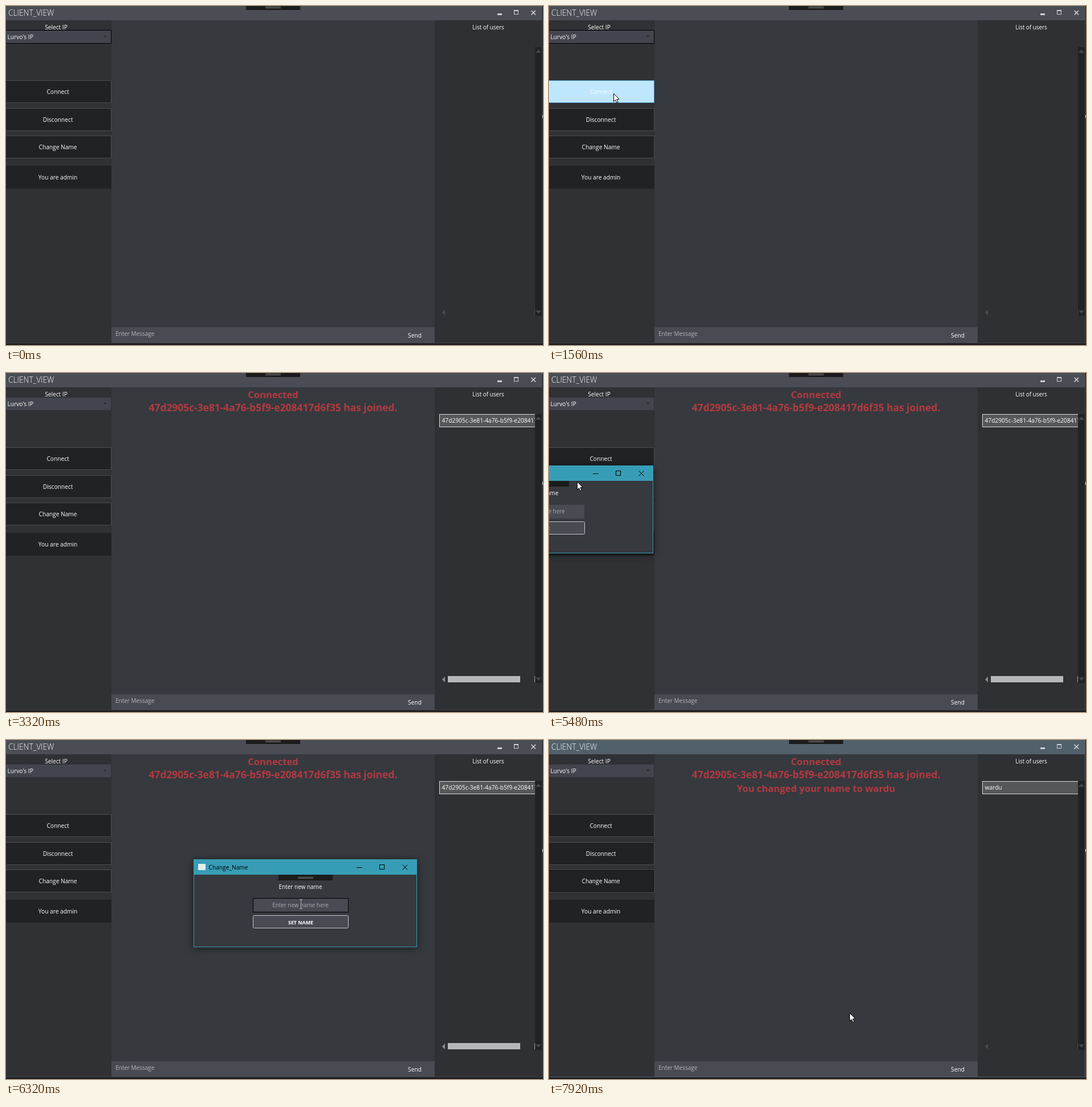
An HTML page with a canvas that plays this animation: 942 px wide and 594 px high, repeating every 8000 ms.

```html
<!DOCTYPE html>
<html lang="en">
<head>
<meta charset="utf-8">
<title>Chat client</title>
<style>
html, body { margin: 0; width: 100%; height: 100%; overflow: hidden; background: #1d1c1e; }
canvas { display: block; }
</style>
</head>
<body>
<canvas id="stage" width="942" height="594"></canvas>
<script>
const g = document.getElementById('stage').getContext('2d');
const LOOP = 8000, STEP = 40;
const FACE = '"Open Sans", "Noto Sans", sans-serif';
const GUID = '47d2905c-3e81-4a76-b5f9-e208417d6f35';
const NAME = 'wardu';
const KEYS = [6720, 6800, 6920, 7000, 7200];
const DIALOG_OPEN = 5480, DIALOG_SHUT = 7640;

// Pointer trips: time, x, y of the tip
const TRIPS = [
  { end: 320, pts: [[40, 926, 588], [160, 895, 579], [280, 828, 590]] },
  { end: 3200, pts: [[1160, 208, 472], [1240, 196, 400], [1360, 150, 240], [1480, 118, 165],
    [1560, 113, 153], [2400, 113, 153], [2600, 108, 200], [2720, 100, 243],
    [2880, 100, 243], [3000, 78, 247], [3200, -14, 250]] },
  { end: 6720, pts: [[5480, 49, 190], [5520, 175, 200], [5560, 305, 211], [5600, 412, 219],
    [5640, 480, 222], [5680, 509, 223], [5720, 516, 222], [5760, 516, 222], [5880, 517, 287]] },
  { end: 8000, pts: [[7200, 516, 292], [7360, 512, 340], [7480, 512, 340], [7560, 514, 318],
    [7640, 514, 318], [7760, 520, 400], [7880, 527, 478]] }
];
const DRAG = [[5480, -209, 162], [5520, -100, 174], [5560, 45, 190], [5600, 180, 202],
  [5640, 275, 209], [5680, 322, 210], [5720, 328, 209], [5760, 329, 209]];

const BUTTONS = [
  { label: 'Connect', y: 130, hover: [[1440, 2480]] },
  { label: 'Disconnect', y: 178.5, hover: [[1400, 1440], [2520, 2640]] },
  { label: 'Change Name', y: 227, hover: [[1320, 1400], [2640, 3200]] }
];

const ramp = (t, a, b) => Math.min(1, Math.max(0, (t - a) / (b - a)));

function along(t, pts) {
  let p = pts[0];
  for (const q of pts) {
    if (t < q[0]) {
      const k = ramp(t, p[0], q[0]);
      return [p[1] + (q[1] - p[1]) * k, p[2] + (q[2] - p[2]) * k];
    }
    p = q;
  }
  return [p[1], p[2]];
}

function mix(a, b, k) {
  return 'rgb(' + a.map((v, i) => Math.round(v + (b[i] - v) * k)).join(',') + ')';
}

function box(x, y, w, h, color) {
  g.fillStyle = color;
  g.fillRect(x, y, w, h);
}

function frame(x, y, w, h, color) {
  g.strokeStyle = color;
  g.lineWidth = 1;
  g.strokeRect(x + .5, y + .5, w - 1, h - 1);
}

function text(s, x, y, o = {}) {
  g.font = `${o.weight || 400} ${o.size || 10.2}px ${FACE}`;
  g.textAlign = o.align || 'center';
  g.fillStyle = o.color || '#fff';
  g.fillText(s, x, y);
}

function shape(pts, color) {
  g.beginPath();
  pts.forEach(([x, y]) => g.lineTo(x, y));
  g.closePath();
  g.fillStyle = color;
  g.fill();
}

function cross(x, y, size, color, width) {
  g.strokeStyle = color;
  g.lineWidth = width;
  g.beginPath();
  g.moveTo(x, y);
  g.lineTo(x + size, y + size);
  g.moveTo(x + size, y);
  g.lineTo(x, y + size);
  g.stroke();
}

function toolTab(x, y, h) {
  box(x, y, 95, h, '#1b1c1b');
  box(x + 34, y + h - 6, 27, 1, '#70716f');
  box(x + 34, y + h - 4, 27, 1, '#70716f');
}

function titleBar(active) {
  box(0, 0, 941, 25, mix([74, 77, 84], [82, 96, 108], active));
  text('CLIENT_VIEW', 4, 17, { size: 13.7, weight: 300, align: 'left' });
  toolTab(421, 0, 7);
  box(862, 13, 8, 3, '#cfd0d1');
  frame(891, 7, 8, 8, '#cfd0d1');
  box(891, 7, 8, 2, '#cfd0d1');
  cross(921.5, 8, 7.5, '#d4d5d6', 1.6);
}

function sidebar(t) {
  box(0, 25, 185, 566, '#303135');
  text('Select IP', 88, 40.5);
  box(0, 43, 184, 22, '#43454e');
  const edge = 1 - ramp(t, 1720, 1880);
  if (edge > 0) frame(-1, 42, 186, 24, `rgba(0,0,0,${edge})`);
  text("Lurvo's IP", 2.5, 58, { align: 'left' });
  shape([[170.5, 52], [176.5, 52], [173.5, 55]], '#2a2b30');

  for (const b of BUTTONS) {
    const y = Math.round(b.y);
    let k = 0;
    for (const [a, z] of b.hover) k += ramp(t, a, a + 80) - ramp(t, z, z + 120);
    k = Math.min(1, k);
    box(-1, y, 186, 40, mix([32, 34, 37], [190, 230, 253], k));
    frame(-1, y, 186, 40, mix([76, 77, 80], [60, 127, 177], k));
    if (b.label === 'Change Name' && t >= DIALOG_SHUT) frame(-1, y + 1, 185, 38, '#08090a');
    text(b.label, 91, y + 24);
  }
  box(0, 280, 185, 40, '#202225');
  text('You are admin', 91, 304);
}

function chat(t) {
  box(185, 25, 567, 538, '#36393e');
  box(185, 563, 567, 28, '#484b52');
  text('Enter Message', 192, 578, { align: 'left', size: 10, color: '#b4b6b9' });
  text('Send', 717, 581);
  const line = (s, y, size) => text(s, 468.5, y, { size, weight: 700, color: '#b23a40' });
  if (t >= 2000) line('Connected', 44, 16.6);
  if (t >= 2160) line(GUID + ' has joined.', 67, 17.4);
  if (t >= 7720) line('You changed your name to ' + NAME, 91, 16.6);
}

function userList(t) {
  box(752, 25, 188, 566, '#2f3034');
  text('List of users', 846, 40.5, { size: 9.9 });
  const renamed = t >= 7720, joined = t >= 2160, wide = joined && !renamed;
  if (joined) {
    g.save();
    g.beginPath();
    g.rect(760, 70, 168, 28);
    g.clip();
    box(761, 72, 175, 22, '#55575a');
    frame(760, 72, 180, 23, '#d9dadb');
    text(renamed ? NAME : GUID, 764.5, 87, { align: 'left' });
    g.restore();
  }
  box(928, 72, 12, 471, '#202225');
  shape([[929, 82], [939, 82], [934, 76.5]], '#48494c');
  shape([[929, 533.5], [939, 533.5], [934, 539]], '#48494c');
  shape([[770, 532], [770, 542], [765, 537]], wide ? '#8d8e90' : '#4c4d50');
  if (wide) box(775, 531, 127, 11, '#b6b7b8');
  box(927, 531, 1, 11, wide ? '#a5a6a8' : '#48494c');
}

function dialog(t) {
  const [dx, dy] = along(t, DRAG).map(Math.round);
  g.save();
  g.translate(dx, dy);
  g.shadowColor = 'rgba(0,0,0,.5)';
  g.shadowBlur = 13;
  g.shadowOffsetY = 2;
  box(0, 0, 392, 154, '#36393e');
  g.shadowColor = 'transparent';
  frame(0, 0, 392, 154, '#379db6');
  box(0, 0, 392, 27, '#379db6');
  box(8, 8, 13, 11, '#e4eef0');
  text('Change_Name', 26.5, 18, { align: 'left', color: '#000' });
  box(286, 14, 10, 1, '#000');
  frame(326, 9, 9, 9, '#000');
  cross(366.5, 9.5, 9, '#000', 1);
  toolTab(149, 27, 10);
  text('Enter new name', 187.5, 52, { size: 10 });

  box(104, 69, 167, 24, '#484b52');
  const focus = ramp(t, 6040, 6320);
  if (focus > 0) frame(104, 68, 168, 25, `rgba(0,0,0,${focus})`);
  const typed = NAME.slice(0, KEYS.filter(k => t >= k).length);
  if (typed) text(typed, 187.5, 83.5);
  else text('Enter new name here', 187.5, 84, { size: 9.9, color: '#a9abae' });
  if (t >= 6040 && t < 6560 || typed) {
    const half = typed ? g.measureText(typed).width / 2 : 0;
    box(Math.round(188 + half), 72, 1, 14, '#c8c8c6');
  }

  g.beginPath();
  g.roundRect(104.5, 98.5, 167, 22, 2);
  g.fillStyle = '#484b52';
  g.fill();
  g.strokeStyle = '#c3c4c6';
  g.lineWidth = 1;
  g.stroke();
  text('SET NAME', 188, 114, { size: 8.9, weight: 700 });
  g.restore();
}

function pointer(t) {
  const trip = TRIPS.find(p => t >= p.pts[0][0] && t < p.end);
  if (!trip) return;
  const [x, y] = along(t, trip.pts);
  g.save();
  g.translate(Math.round(x), Math.round(y));
  const inField = t >= 5840 && t < DIALOG_SHUT && y > 277 && y < 302;
  if (inField) {
    box(0, -7, 1, 15, '#b8b6b0');
    box(-2, -8, 5, 1, '#b8b6b0');
    box(-2, 8, 5, 1, '#b8b6b0');
  } else {
    shape([[.5, .5], [.5, 14.5], [3.6, 11.6], [6, 16.6], [8.2, 15.6], [5.9, 10.6], [10, 10.2]], '#fff');
    g.strokeStyle = '#000';
    g.lineWidth = 1;
    g.stroke();
  }
  g.restore();
}

function draw(t) {
  const active = ramp(t, 1720, 1960) - ramp(t, 2880, 3120) + ramp(t, DIALOG_SHUT, 7880);
  box(0, 0, 942, 594, '#1f1d1f');
  sidebar(t);
  chat(t);
  userList(t);
  titleBar(active);
  const edge = mix([66, 69, 75], [78, 98, 114], active);
  box(0, 590, 941, 1, edge);
  box(940, 25, 1, 566, edge);
  box(941, 191, 1, 5, '#dcdcdc');
  if (t >= DIALOG_OPEN && t < DIALOG_SHUT) dialog(t);
  pointer(t);
}

function tick(now) {
  draw(Math.floor(now % LOOP / STEP) * STEP);
  requestAnimationFrame(tick);
}
draw(0);
requestAnimationFrame(tick);
</script>
</body>
</html>
```
